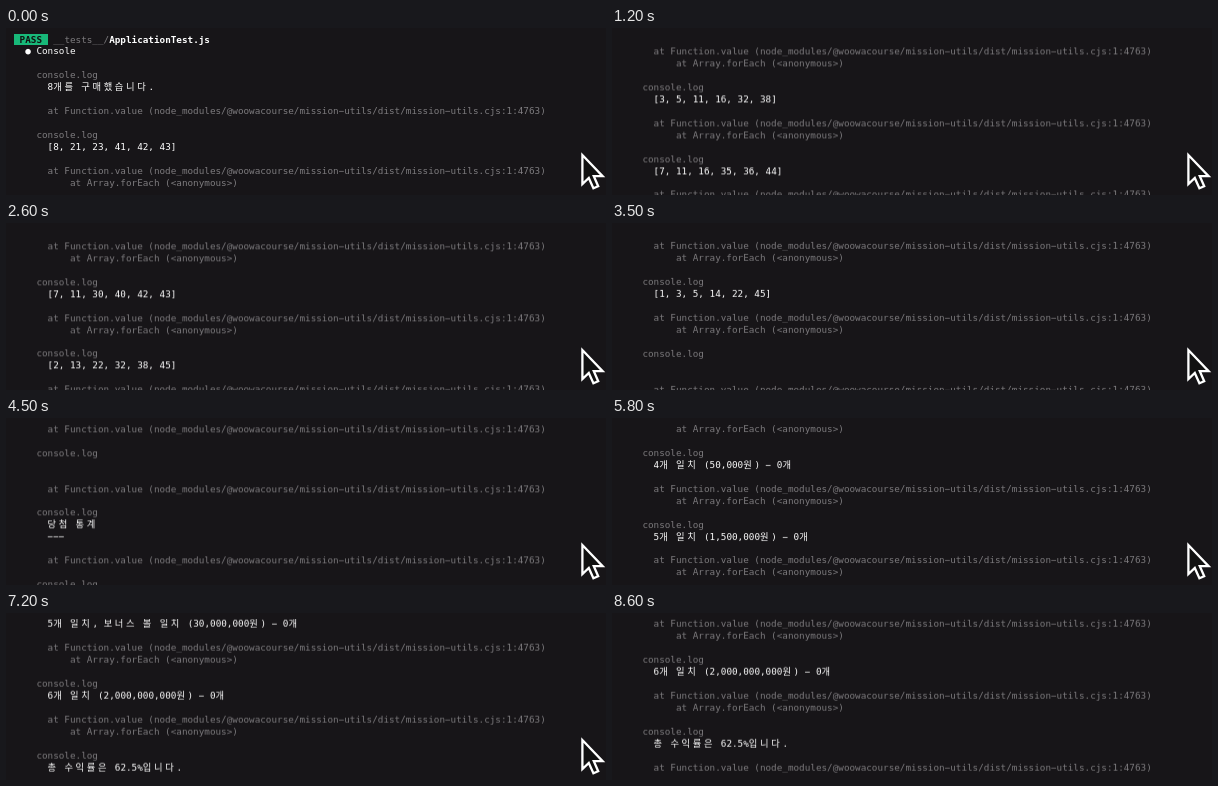
Write an HTML page that moves like this. It is 600 px wide and 167 px high and loops after 9300 ms.

```html
<!DOCTYPE html>
<html lang="ko">
<head>
<meta charset="utf-8">
<title>Test log</title>
<style>
  :root { --row: 11.96px; }
  html, body { margin: 0; width: 100%; height: 100%; overflow: hidden; background: #171518; }
  #terminal {
    position: absolute; left: 8px; top: 5.5px; width: 592px; height: 161.5px; overflow: hidden;
    font: 9.31px/var(--row) "DejaVu Sans Mono", "Noto Sans CJK KR", "Noto Sans CJK", monospace;
    color: #7e7c7f;
  }
  #log { animation: scroll 9300ms step-end infinite; }
  .line { height: var(--row); white-space: pre; }
  .line b, .line i { color: #fff; font-style: normal; }
  .line .pass { display: inline-block; height: var(--row); background: #18b879; color: #111; }
  .wide { display: inline-block; width: 1.204em; font-family: "Noto Sans CJK KR", "Noto Sans CJK", sans-serif; }
  #pointer { position: absolute; left: 0; top: 0; animation: fade 9300ms step-end infinite; }
  @keyframes fade {
    0% { opacity: 1; }
    91.35% { opacity: .5; }
    92.42% { opacity: 0; }
  }
</style>
</head>
<body>
<div id="terminal"><div id="log"></div></div>
<svg id="pointer" width="600" height="167" viewBox="0 0 600 167">
  <path d="M576.4 127V156L582.8 150L587.4 160.2L592.2 158.2L587.8 148.2H596.6Z"
        fill="#111" stroke="#fff" stroke-width="2.3"/>
</svg>
<script>
  const LOOP = 9300;
  const lines = [
    '<b class="pass"> PASS </b> __tests__/<b>ApplicationTest.js</b>',
    '  <i>● Console</i>',
    ''
  ];

  function print(text, inLoop = false) {
    lines.push('    console.log');
    for (const part of text.split('\n')) lines.push(`      <i>${part}</i>`);
    lines.push('', '      at Function.value (node_modules/@woowacourse/mission-utils/dist/mission-utils.cjs:1:4763)');
    if (inLoop) lines.push('          at Array.forEach (&lt;anonymous&gt;)');
    lines.push('');
  }

  print('8개를 구매했습니다.');
  [
    '8, 21, 23, 41, 42, 43', '3, 5, 11, 16, 32, 38', '7, 11, 16, 35, 36, 44', '1, 8, 11, 31, 41, 42',
    '13, 14, 16, 38, 42, 45', '7, 11, 30, 40, 42, 43', '2, 13, 22, 32, 38, 45', '1, 3, 5, 14, 22, 45'
  ].forEach(ticket => print(`[${ticket}]`, true));
  print('');
  print('');
  print('당첨 통계\n---');
  [
    '3개 일치 (5,000원) - 1개', '4개 일치 (50,000원) - 0개', '5개 일치 (1,500,000원) - 0개',
    '5개 일치, 보너스 볼 일치 (30,000,000원) - 0개', '6개 일치 (2,000,000,000원) - 0개'
  ].forEach(result => print(result, true));
  print('총 수익률은 62.5%입니다.');

  // The terminal draws long hyphens, and Hangul takes two cells.
  const toCells = line => line
    .replace(/-/g, '−')
    .replace(/[가-힣]/g, '<span class="wide">$&</span>');
  document.getElementById('log').innerHTML =
    lines.map(line => `<div class="line">${toCells(line)}</div>`).join('');

  // Each scroll: start time, then lines moved per 100 ms.
  const scrolls = [
    [500, '12211'], [1100, '1232211111'], [2100, '1332211'], [3200, '243211'],
    [4200, '243211'], [5300, '14432111'], [6600, '1332211'], [7500, '11']
  ];
  let row = 0;
  let stops = '0% { transform: none; }';
  for (const [start, steps] of scrolls) {
    [...steps].forEach((step, i) => {
      row += Number(step);
      const percent = (start + i * 100 - 5) / LOOP * 100;
      stops += `${percent.toFixed(3)}% { transform: translateY(calc(var(--row) * -${row})); }`;
    });
  }
  // Hold the last position until the loop restarts.
  stops += `100% { transform: translateY(calc(var(--row) * -${row})); }`;
  const style = document.createElement('style');
  style.textContent = `@keyframes scroll { ${stops} }`;
  document.head.append(style);
</script>
</body>
</html>
```
